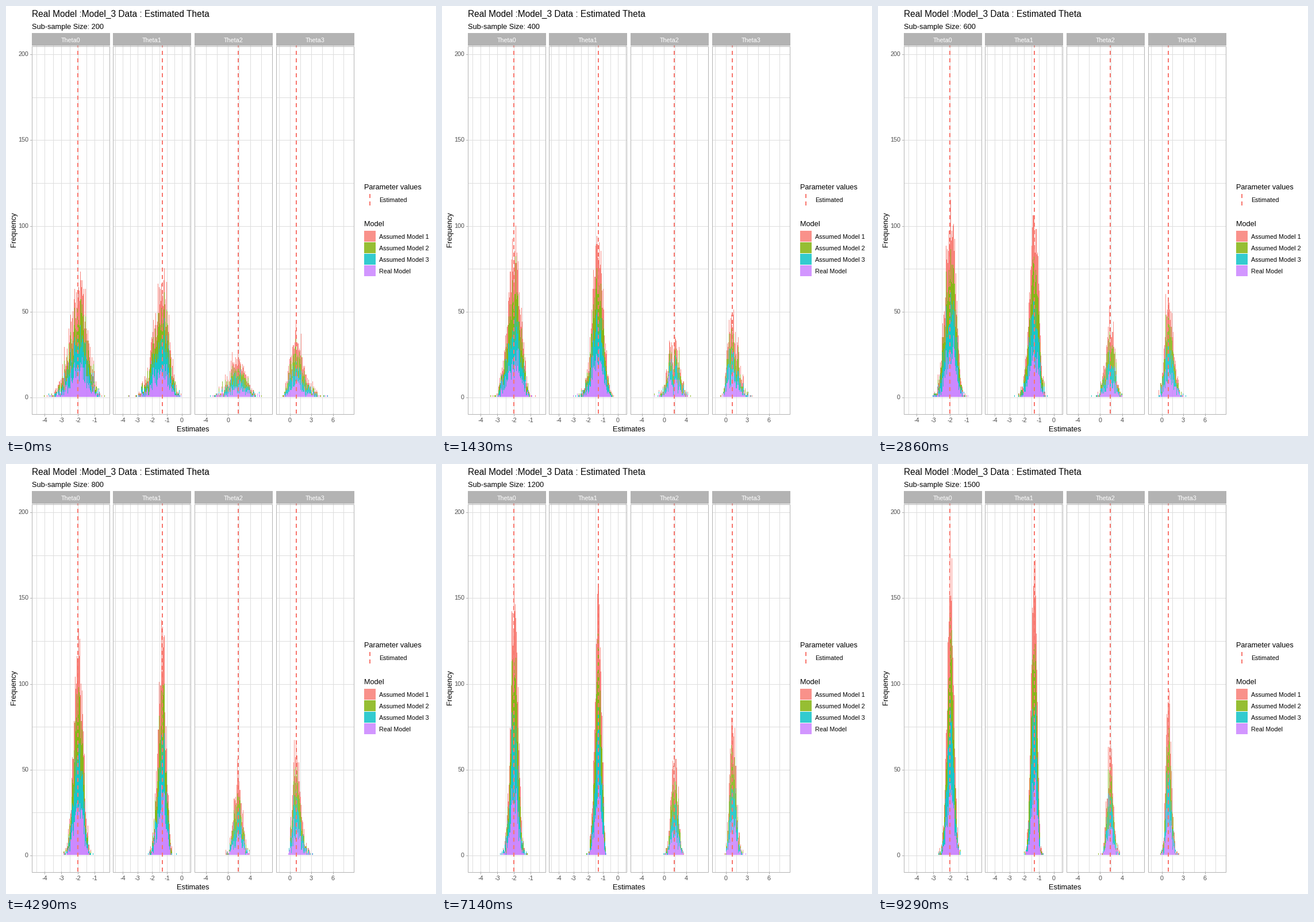
Animation of 748 by 748 pixels, one loop 10000 ms. Source, as a matplotlib script:

```python
import numpy as np
import matplotlib.pyplot as plt
from matplotlib.animation import FuncAnimation
from matplotlib.collections import LineCollection
from matplotlib.patches import Rectangle

SIDE, DPI = 748, 88
PX = 72 / DPI                      # points per pixel
STEPS, FRAMES, LOOP = 14, 200, 10000
TOP, BOTTOM, WIDTH = 69, 709, 135
ZERO, UNIT = 680, 2.984            # pixel row of count 0, pixels per count
BIN, REPS = 0.02, 1000
GRID, EDGE, DARK, RED = "#dedede", "#b3b3b3", "#4d4d4d", "#f8766d"
MODELS = [("Real Model", "#c77cff"), ("Assumed Model 3", "#00bfc4"),
          ("Assumed Model 2", "#7cae00"), ("Assumed Model 1", RED)]

# left edge, pixel of 0, pixels per unit, labels, minor ticks, dashed line,
# then mean, drift of the mean, spread and signed skew at the smallest size
PANELS = [
    dict(left=45, zero=183.2, scale=28.95, ticks=[-4, -3, -2, -1],
         minor=[-4.5, -3.5, -2.5, -1.5, -0.5], line=125,
         mean=125.7, drift=-0.5, sd=15.5, skew=-0.25),
    dict(left=186, zero=305.8, scale=25.7, ticks=[-4, -3, -2, -1, 0],
         minor=[-4.5, -3.5, -2.5, -1.5, -0.5, 0.5], line=272,
         mean=271.5, drift=-2.5, sd=13.5, skew=-0.45),
    dict(left=328, zero=386.2, scale=9.6, ticks=[-4, 0, 4],
         minor=[-2, 2, 6], line=404,
         mean=404.2, drift=-2.5, sd=14, skew=-0.1),
    dict(left=470, zero=493.5, scale=12.5, ticks=[0, 3, 6],
         minor=[-1.5, 1.5, 4.5, 7.5], line=505,
         mean=505.2, drift=3, sd=13, skew=0.8),
]

plt.rcParams["font.family"] = "Liberation Sans"
fig = plt.figure(figsize=(SIDE / DPI, SIDE / DPI), dpi=DPI, facecolor="white")
ax = fig.add_axes([0, 0, 1, 1])
ax.set(xlim=(0, SIDE), ylim=(SIDE, 0))
ax.axis("off")
segments = {GRID: [], EDGE: []}


def label(x, y, s, size, color="black", ha="left", **kw):
    return ax.text(x, y, s, fontsize=size * PX, color=color, ha=ha,
                   va="baseline", **kw)


def center(v):
    """Middle of the pixel nearest to v."""
    return np.floor(v + 0.5) + 0.5


def hline(y, x0, x1, color):
    segments[color].append([(x0, center(y)), (x1, center(y))])


def vline(x, y0, y1, color):
    segments[color].append([(center(x), y0), (center(x), y1)])


def dashed(x, bottom, top):
    ax.plot([x, x], [bottom, top], color=RED, lw=2 * PX, zorder=5,
            antialiased=False, dashes=(3.4, 3.4), dash_capstyle="butt")


def box(x, y, w, h, color, **kw):
    ax.add_patch(Rectangle((x, y), w, h, fc=color, lw=0, **kw))


def count_row(count):
    return ZERO - UNIT * count


def draw_panel(i, p):
    left, right = p["left"], p["left"] + WIDTH
    for count in range(0, 201, 25):
        hline(count_row(count), left, right, GRID)
    for v in p["minor"] + p["ticks"]:
        vline(p["zero"] + p["scale"] * v, TOP, BOTTOM, GRID)
    for v in p["ticks"]:
        x = p["zero"] + p["scale"] * v
        vline(x, BOTTOM, BOTTOM + 4, EDGE)
        label(x, 724, str(v), 10.8, DARK, "center")
    dashed(p["line"], BOTTOM, TOP)
    ax.add_patch(Rectangle((left + 0.5, TOP + 0.5), WIDTH, BOTTOM - TOP,
                           fill=False, ec=EDGE, lw=PX, zorder=6))
    box(left, 47, WIDTH + 1, TOP - 47, EDGE)
    label(left + WIDTH / 2, 63, f"Theta{i}", 10.7, "white", "center")

    # bins wider than half a pixel overlap and look denser
    alpha = 0.9 if BIN * p["scale"] > 0.5 else 0.8
    edges = np.arange(left, right + 1)
    flat = np.full(WIDTH, float(ZERO))
    return [ax.stairs(flat, edges, baseline=flat, fill=True, color=c, alpha=alpha,
                      lw=0, antialiased=False, snap=False, zorder=3)
            for _, c in MODELS]


def draw_legend():
    label(623, 319, "Parameter values", 12.8)
    dashed(633, 347, 327)
    label(649, 341, "Estimated", 10.75)
    label(623, 383, "Model", 12.8)
    for k, (name, color) in enumerate(reversed(MODELS)):
        y = 391 + 20.1 * k
        box(623, round(y), 20, 19, color, alpha=0.8)
        label(649, y + 14, name, 10.75)


def column_counts(rng, p, n):
    """Counts of the one narrow bin that shows in each pixel column."""
    shrink = np.sqrt(200 / n)
    shape = 4 / (p["skew"] * shrink) ** 2
    z = (rng.gamma(shape, size=REPS) - shape) / np.sqrt(shape)
    x = p["mean"] + p["drift"] * shrink ** 2 + np.sign(p["skew"]) * p["sd"] * shrink * z
    shown = x[x % 1 < BIN * p["scale"]]
    return np.histogram(shown, np.arange(p["left"], p["left"] + WIDTH + 1))[0]


label(45, 19, "Real Model :Model_3 Data : Estimated Theta", 15.55)
subtitle = label(45, 40, "", 12.8)
label(325, 740, "Estimates", 12.9, ha="center")
label(17.5, 388.5, "Frequency", 12.9, ha="center", rotation=90,
      rotation_mode="anchor")
for count in range(0, 201, 50):
    y = count_row(count)
    hline(y, 42, 45, EDGE)
    label(39, y + 4, str(count), 10.8, DARK, "right")
stacks = [draw_panel(i, p) for i, p in enumerate(PANELS)]
draw_legend()
for color, lines in segments.items():
    ax.add_collection(LineCollection(lines, colors=color, linewidths=PX,
                                     antialiaseds=False, zorder=1), autolim=False)


def update(frame):
    # the step that has begun by the end of this short frame
    step = (STEPS * frame + STEPS - 1) // FRAMES
    n = 200 + 100 * step
    subtitle.set_text(f"Sub-sample Size: {n}")
    rng = np.random.RandomState(n)
    for p, stack in zip(PANELS, stacks):
        total = np.zeros(WIDTH)
        base = np.full(WIDTH, float(ZERO))
        for bars in stack:
            total = total + column_counts(rng, p, n)
            top = np.round(count_row(total))
            bars.set_data(values=top, baseline=base)
            base = top
    return [subtitle] + [bars for stack in stacks for bars in stack]


anim = FuncAnimation(fig, update, frames=FRAMES, interval=LOOP // FRAMES,
                     repeat=True, repeat_delay=0, blit=False)
plt.show()
```
